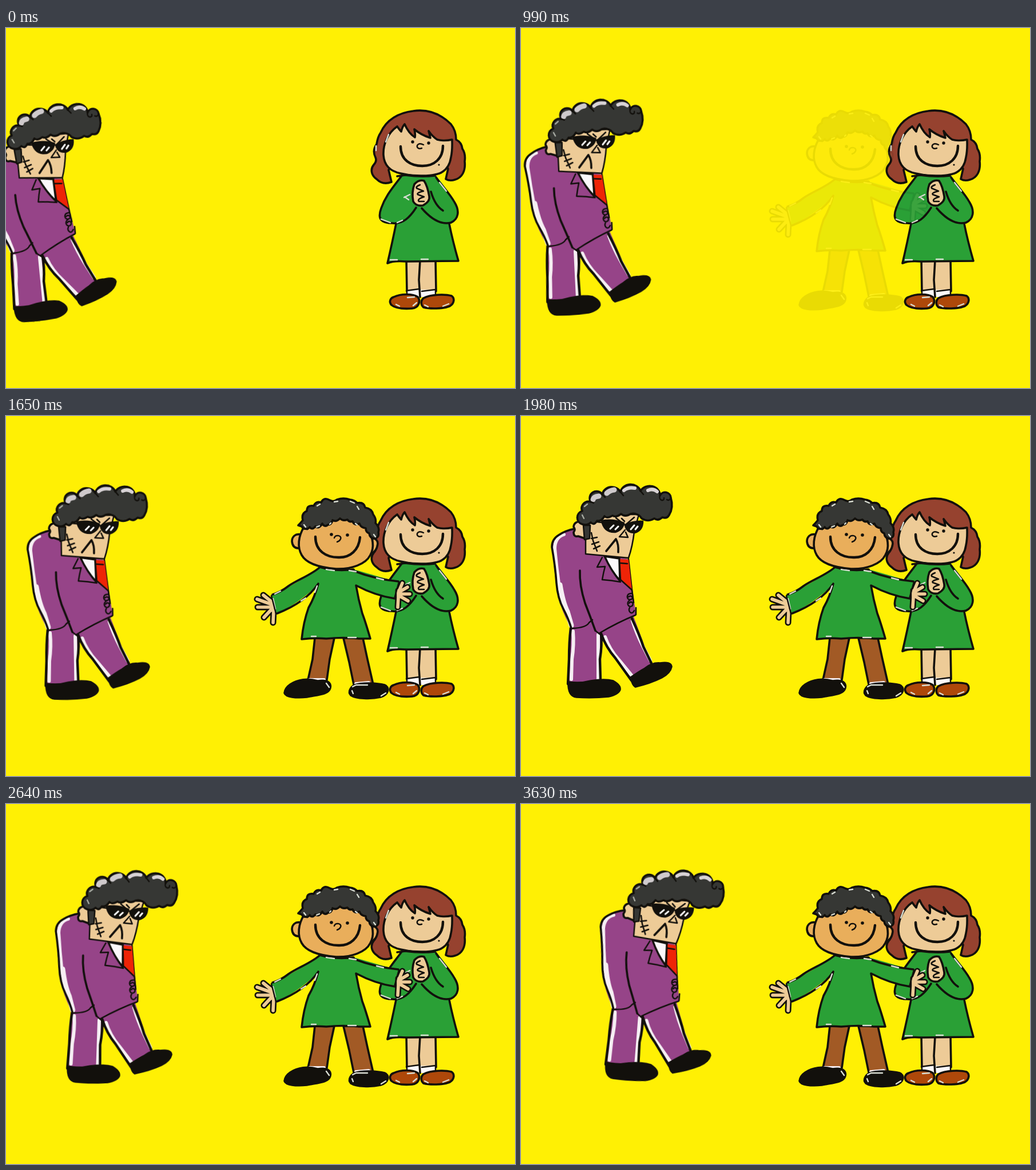
Recreate the animation shown at these times as an HTML page without scripts. Size 890 by 629 pixels, loop 3960 ms.

```html
<!DOCTYPE html>
<html lang="en">
<head>
<meta charset="utf-8">
<title>Walking up to the couple</title>
<style>
html, body { margin: 0; width: 100%; height: 100%; overflow: hidden; background: #fff004; }
svg { display: block; width: 100%; height: 100%; }
.ink { stroke: #12100c; stroke-width: 3.6; stroke-linecap: round; stroke-linejoin: round; fill: none; }
.thin { stroke-width: 2.5; }
.bold { stroke-width: 4.4; }
.purple { fill: #964488; }
.green { fill: #2aa036; }
.skin { fill: #edcb97; }
.tan { fill: #e9ae5b; }
.coal { fill: #363734; }
.auburn { fill: #96422f; }
.brown { fill: #a25a25; }
.rust { fill: #ae480a; }
.black { fill: #12100c; }
.white { fill: #fbf8fa; }
.red { fill: #ee2407; }
.bare { stroke: none; }
.shine { stroke: #f6eff3; stroke-width: 6; }
.wide { stroke-width: 9; }
.glint { stroke: #fff; stroke-width: 3; }
.fleck { stroke: #d9ddd3; stroke-width: 2.4; }
.rim { stroke-width: 11; }
.flesh { stroke: #edcb97; stroke-width: 5.6; }

#man { transform-origin: 263px 297px; animation: walk 3960ms step-end infinite; }
#boy { animation: appear 3960ms step-end infinite; }

@keyframes walk {
  0% { transform: translate(-85px, 6px) rotate(-5.6deg); }
  8.33% { transform: translate(-72px, 4.4px) rotate(-4.6deg); }
  16.66% { transform: translate(-58.4px, 3.1px) rotate(-3.7deg); }
  25% { transform: translate(-44.3px, 2px) rotate(-2.8deg); }
  33.33% { transform: translate(-29.9px, 1.1px) rotate(-1.9deg); }
  41.66% { transform: translate(-15.2px, .4px) rotate(-.9deg); }
  50% { transform: none; }
  58.33% { transform: translate(15.2px, -.1px) rotate(.9deg); }
  66.66% { transform: translate(30.8px, -.1px) rotate(1.9deg); }
  75% { transform: translate(46.6px, .4px) rotate(2.8deg); }
  83.33% { transform: translate(62.7px, 1.1px) rotate(3.7deg); }
  91.66%, 100% { transform: translate(79.1px, 1.9px) rotate(4.6deg); }
}
@keyframes appear {
  0% { opacity: 0; }
  25% { opacity: .09; }
  33.33% { opacity: .52; }
  41.66%, 100% { opacity: 1; }
}
</style>
</head>
<body>
<svg viewBox="0 0 890 629">
  <defs>
    <path id="left-hand" d="M466 326L450 313M464 329L439 320M464 334L440 334M464 338L451 352M468 340L467 361M466 328V340"/>
    <path id="right-hand" d="M688 304L693 292M690 306L702 299M690 311L706 311M689 315L703 323M686 318L685 334M686 305V318"/>
  </defs>

  <g id="girl" class="ink">
    <path class="skin" d="M700 404L701 460H752L751 404Z"/>
    <path class="white bare" d="M702 458L750 457V470H702Z"/>
    <path class="thin" d="M700 459L722 456M727 460L751 457M701 458V469M751 458V468"/>
    <path d="M724 406L722 440L724 470"/>
    <path class="rust" d="M678 470C690 464 712 464 720 470C726 478 721 489 710 490C696 491 681 490 674 484C669 478 672 472 678 470Z"/>
    <path class="rust" d="M730 472C742 465 768 465 779 468C785 472 784 481 776 486C764 491 740 491 730 488C725 484 725 476 730 472Z"/>
    <path class="fleck" d="M682 483L688 486M702 471L714 470M712 485L718 480M732 484L738 487M764 486L774 482"/>

    <path class="auburn" d="M674 269C664 273 655 271 648 264C638 257 637 246 643 239Q649 233 646 226Q640 214 648 203Q650 190 655 183C665 160 687 148 712 145C740 141 762 152 778 168C786 178 787 187 787 195Q797 200 798 211Q804 220 802 233C804 250 797 262 785 265Q776 268 769 264L773 246L760 225H680L669 248Z"/>
    <path class="skin" d="M684 172C668 183 659 203 660 222C661 238 670 250 690 254C710 259 742 260 758 254C770 249 776 240 778 226C781 212 780 203 780 195Q766 198 754 195Q746 190 739 180Q741 187 742 192Q726 187 714 177Q716 185 715 191Q704 184 697 168Q693 172 691 181Q688 178 684 172Z"/>
    <path class="fleck" d="M669 186L664 199M647 206V214"/>
    <path class="bold" d="M690 207C690 231 708 241 728 241C749 241 764 228 764 206"/>
    <path class="thin" d="M730 204C722 200 718 204 719 208Q721 212 727 210"/>
    <g class="black bare"><circle cx="711" cy="199" r="2.7"/><circle cx="739" cy="201" r="2.7"/><circle cx="757" cy="239" r="1.6"/></g>

    <path class="green bare" d="M692 258H752C766 276 790 304 790 322C788 346 768 343 775 341Q781 370 791 407L700 407Q678 406 667 411Q676 370 682 341C662 344 654 340 654 328C652 312 668 285 692 258Z"/>
    <path d="M692 258C678 277 664 292 656 315C649 334 656 341 676 341C694 343 706 331 717 314M684 259L698 257Q726 261 750 258M752 261C763 278 774 286 784 304C794 320 791 334 778 340C758 345 740 330 727 315M743 286C748 303 756 314 764 319"/>
    <path d="M682 342Q676 372 667 411Q678 406 700 408L791 407Q781 372 775 342"/>
    <path class="fleck" d="M696 296L706 291M704 300L697 295M656 334L672 340M684 340L693 336M758 270L770 285M672 405H684M726 404H738"/>
    <path class="skin" d="M714 273Q722 264 731 267Q737 276 740 294Q742 303 729 310Q717 312 712 303Q709 287 714 273Z"/>
    <path class="thin" d="M724 274Q716 277 718 280L730 285Q717 288 720 291L731 295Q718 299 722 303L731 303"/>
  </g>

  <g id="boy" class="ink">
    <path class="brown" d="M540 388L536 425L528 461H561L566 425L574 388Z"/>
    <path class="brown" d="M590 388L600 430L608 469H642L632 425L624 388Z"/>
    <path class="shine" d="M531 461H556M612 468L634 466"/>
    <path class="black" d="M497 469C510 460 528 458 545 463C562 460 569 466 567 475C564 487 545 487 526 491C507 493 489 491 487 484Q488 475 497 469Z"/>
    <path class="black" d="M610 470C624 465 650 467 662 470C672 474 669 487 655 491C638 495 612 494 603 488C597 482 603 473 610 470Z"/>
    <path class="fleck" d="M560 467L565 474M606 473L612 470H632M607 485L605 480M656 489L664 484"/>

    <use href="#left-hand" class="rim"/><use href="#left-hand" class="flesh"/>
    <path class="green bare" d="M549 264L608 268C640 277 665 285 688 290L680 319C655 317 632 308 612 296C617 330 628 360 637 389Q580 386 517 390Q524 340 546 294Q515 325 473 346L463 314Q515 290 549 264Z"/>
    <path d="M549 264C535 277 510 286 494 297Q480 308 466 312M474 345C510 331 533 312 546 293Q540 316 529 335Q520 360 517 390Q540 387 560 389Q590 386 617 389L637 389Q628 358 623 345Q616 320 612 296Q646 314 680 319M609 271Q645 285 686 289M549 264Q575 272 608 268"/>
    <path class="fleck" d="M470 311L480 306M467 319L471 337M560 268L574 270M600 270L612 272M534 385H542M598 387H612M648 283L660 286M516 323L524 318M544 297L540 308"/>
    <use href="#right-hand" class="rim"/><use href="#right-hand" class="flesh"/>
    <path class="thin" d="M464 314L472 345M687 290L679 319"/>

    <path class="tan" d="M515 207C506 205 500 211 500 219Q501 232 514 231ZM641 213Q650 215 650 223Q648 238 638 240Z"/>
    <path class="tan" d="M521 194C511 210 509 229 517 243C526 259 551 265 577 267C604 268 629 259 637 243C645 229 641 212 634 200L610 176H545Z"/>
    <path class="coal" d="M525 197Q520 198 517 193L511 191Q515 187 519 182Q516 170 526 166Q526 155 538 157Q542 148 551 151Q556 141 566 147Q573 151 579 146Q590 142 601 146Q610 147 614 152Q626 150 628 160Q640 162 642 172Q648 180 646 187Q654 195 651 203Q653 212 645 214Q636 214 635 205Q629 203 629 196Q620 195 618 188Q609 192 606 184Q600 186 597 181Q589 184 584 179Q577 186 571 182Q569 190 563 190Q557 195 553 188Q547 198 541 193Q535 200 531 194Q527 199 525 197Z"/>
    <path class="fleck" d="M574 150L580 149M602 149L609 152M614 158L617 163M544 157L549 154M548 192L543 194M521 190L524 194M566 189L568 187M611 188L614 190M643 207L646 211"/>
    <path class="bold" d="M541 211C541 236 560 247 581 247C602 248 617 234 619 212"/>
    <path class="thin" d="M574 213C576 206 588 209 585 215Q583 219 579 220"/>
    <g class="black bare"><circle cx="569" cy="207" r="2.8"/><circle cx="597" cy="208" r="2.8"/></g>
  </g>

  <g id="man" class="ink">
    <path class="purple bare" d="M86 365L84 466H139L140 380L165 424L193 462L228 434L196 348Z"/>
    <path class="shine" d="M91 376Q93 400 89 425L88 460M135 382V462M147 386Q154 407 171 426L194 454M195 358Q202 380 213 402L226 427"/>
    <path class="bold" d="M87 370Q84 395 84 425L82 468M139 462L138 425Q142 400 140 380Q149 405 165 423L193 462M194 354Q207 382 214 403L228 432"/>
    <path class="black" d="M83 465Q104 468 122 463Q147 459 161 463Q174 470 173 478Q170 486 153 490Q125 493 97 491Q82 489 83 465Z"/>
    <path class="black" d="M192 457Q206 447 217 441Q229 431 243 432Q262 429 263 438Q261 449 246 457Q226 467 200 473Q195 470 192 457Z"/>

    <path class="purple bare" d="M94 197Q55 204 55 226Q57 270 64 310Q70 340 88 372Q110 371 122 359L130 372L143 378L201 347L188 250L120 235V197Z"/>
    <path class="shine" d="M75 207Q59 212 59 232Q62 265 67 300"/>
    <path class="shine wide" d="M68 295Q73 326 81 342L88 366"/>
    <path d="M94 197Q78 200 66 208Q54 215 54 229Q60 263 62 292Q64 318 74 337Q83 354 88 371"/>
    <path d="M103 270Q102 296 112 327Q121 350 130 375"/>
    <path class="thin" d="M90 371Q114 370 119 361L125 356M136 380Q170 360 200 348M130 375L140 383"/>
    <path class="thin" d="M188 250L194 304L197 326"/>
    <path class="thin" d="M193 310C184 310 184 320 190 321C198 321 195 311 188 316M190 322C183 326 188 336 194 332C199 327 192 322 189 327M190 335C186 341 194 349 198 340M201 347V335"/>
    <path class="white" d="M146 245L172 249L173 288Q157 270 146 245Z"/>
    <path class="red bare" d="M172 250L188 251L194 304L173 286Z"/>
    <path class="thin" d="M172 250L174 286L194 304M174 257L186 258"/>
    <path class="purple thin" d="M142 247L133 264L147 263Q144 274 142 286Q158 287 174 290Q158 272 146 246"/>

    <path class="skin" d="M112 186H106C100 182 92 187 92 194Q96 198 92 203Q92 212 100 210L112 214Z"/>
    <path class="skin thin" d="M113 184V241L188 248Q195 228 198 202L206 172H140Z"/>
    <path class="coal thin" d="M109 191L121 191L120 214L111 216Z"/>
    <path class="thin" d="M123 184L141 186M166 178L181 190M198 177L183 190M176 179L181 184"/>
    <path class="black thin" d="M141 183Q160 179 180 187Q178 199 165 203Q145 204 141 183ZM182 190Q198 183 213 184Q213 200 199 204Q184 204 182 190Z"/>
    <path class="glint" d="M156 197L162 191M165 198L170 193M192 198L198 191M200 198L204 193"/>
    <path class="thin" d="M182 199L172 211L187 212L183 203"/>
    <path d="M149 236L166 215Q171 224 170 238"/>
    <path class="thin" d="M123 204L126 218L133 236M123 214L133 212M124 224L136 220M127 232L138 227"/>

    <path class="coal" d="M107 189A12 12 0 0 1 107 166A12 12 0 0 1 122 150A11 11 0 0 1 142 137A17 16 0 0 1 174 133A18 16 0 0 1 209 131A18 16 0 0 1 243 139A10 10 0 0 1 262 143Q267 160 259 173Q255 180 247 177Q240 184 233 179Q222 186 211 179Q207 173 203 172Q195 168 188 173Q180 176 175 171Q166 178 160 174Q150 180 146 175Q140 185 133 183Q128 192 122 186Q116 192 107 189Z"/>
    <path class="shine wide" opacity=".8" d="M126 146Q127 141 136 140M150 135Q155 130 163 129"/>
    <path class="shine" opacity=".85" d="M180 130Q187 124 199 126M222 130Q231 126 238 132"/>
    <path class="fleck" opacity=".7" d="M111 158L116 154M110 179L107 173"/>
    <path class="thin" d="M243 139C240 148 251 150 250 143M262 143Q259 149 255 146M122 150L127 152M142 137L147 142M174 133L179 139M209 131L214 137"/>
  </g>
</svg>
</body>
</html>
```
